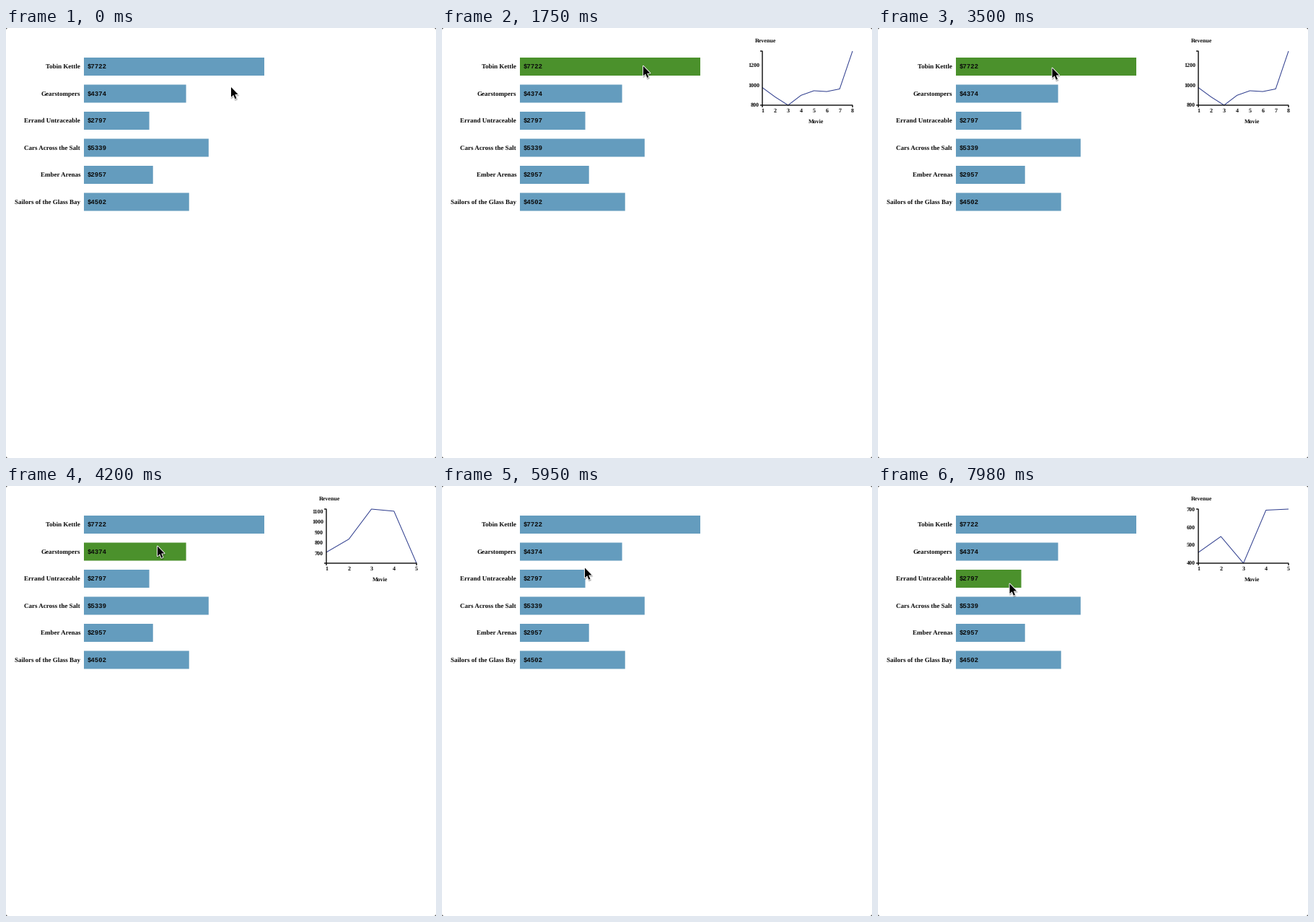
Write a matplotlib script that moves like this. It is 596x596 px and loops after 8000 ms.

```python
import matplotlib.pyplot as plt
import numpy as np
from matplotlib.animation import FuncAnimation
from matplotlib.patches import Polygon, Rectangle

SIZE, DPI = 596, 100
LOOP, INTERVAL, TICK = 8000, 20, 70
PX = 72 / DPI  # points per pixel
WAKE = 1540  # the page reacts to the pointer from here on

BLUE, GREEN, NAVY, INK = "#649cbe", "#4b912c", "#2b3a8c", "#0a0a0a"

# revenue per movie; a single value is a total without a chart
FRANCHISES = {
    "Tobin Kettle": [974, 879, 797, 896, 942, 934, 960, 1340],
    "Gearstompers": [709, 835, 1123, 1103, 604],
    "Errand Untraceable": [458, 547, 398, 694, 700],
    "Cars Across the Salt": [5339],
    "Ember Arenas": [2957],
    "Sailors of the Glass Bay": [4502],
}

# pointer key points: time, (x, y)
PATH = {
    0: (312, 82), 840: (280.5, 52.5), WAKE: (280.5, 52.5), 2520: (273, 53.5),
    3010: (250, 54.5), 3220: (250, 54.5), 3500: (241.5, 55.5),
    4200: (210, 83.5), 5950: (198, 113.5), 7350: (183.5, 134.5), 7980: (182.5, 135.5),
}
ARROW = 1.04 * np.array([(0, 0), (0, 13.2), (3.1, 10.4), (5.2, 15.6),
                         (7.2, 14.8), (5.1, 9.7), (9.2, 9.5)])

plt.rcParams["text.hinting"] = "no_hinting"
fig = plt.figure(figsize=(SIZE / DPI, SIZE / DPI), dpi=DPI, facecolor="white")
ax = fig.add_axes([0, 0, 1, 1])
ax.set(xlim=(0, SIZE), ylim=(SIZE, 0))
ax.axis("off")


def label(x, y, text, px, ha="left", family="Liberation Serif"):
    return ax.text(x, y, text, fontsize=px * PX, ha=ha, va="baseline",
                   family=family, weight="bold", color=INK, parse_math=False)


def line(xs, ys, color=INK, width=1.0):
    return ax.plot(xs, ys, color=color, lw=width * PX, snap=False,
                   solid_capstyle="butt", solid_joinstyle="miter")[0]


def nice_ticks(low, high, count=4):
    """Round tick values at a step of 1, 2, 5 or 10 times a power of ten."""
    raw = (high - low) / count
    base = 10 ** np.floor(np.log10(raw))
    ratio = base / raw
    step = int(base * (10 if ratio <= 0.15 else 5 if ratio <= 0.35 else 2 if ratio <= 0.75 else 1))
    return range(-(-low // step) * step, high + 1, step)


def draw_bar(row, name, total, scale):
    top = 41 + 37.5 * row
    bar = ax.add_patch(Rectangle((108, top), total * scale, 25, fc=BLUE, lw=0, snap=False))
    label(103, top + 15.4, name, 9, "right")
    label(113, top + 15.4, f"${total}", 9, family="Liberation Mono")
    return bar


def draw_chart(values):
    left, right, top, bottom = 444, 569, 32, 107
    low, high = min(values), max(values)

    def to_y(v):
        return bottom - (np.asarray(v) - low) / (high - low) * (bottom - top)

    xs = np.linspace(left, right, len(values))
    parts = [
        line(xs, to_y(values), NAVY),
        line([left - 3, left, left, left - 3], [top, top, bottom, bottom], width=1.4),
        line([left, left, right, right], [bottom + 3, bottom, bottom, bottom + 3], width=1.4),
        label(449, 20, "Revenue", 8, "center"),
        label(519, 132, "Movie", 8, "center"),
    ]
    parts += [label(left - 4, to_y(v) + 2.6, str(v), 8, "right") for v in nice_ticks(low, high)]
    parts += [label(x, bottom + 10, str(n), 8, "center") for n, x in enumerate(xs, 1)]
    return parts


def draw_pointer():
    """Soft shadow, white rim and black arrow, each with its drop."""
    layers = [(1.8, "black", 2.6, 0.10), (1.2, "black", 1.6, 0.16),
              (0, "white", 1.8, 1), (0, "black", 0, 1)]
    return [(ax.add_patch(Polygon(ARROW, fc=color, ec=color, lw=width * PX, alpha=alpha,
                                  joinstyle="round", zorder=10 + k)), drop)
            for k, (drop, color, width, alpha) in enumerate(layers)]


def draw_corners():
    for x, dx in ((0, 2), (SIZE, -2)):
        for y, dy in ((0, 2), (SIZE, -2)):
            ax.add_patch(Polygon([(x, y), (x + dx, y), (x, y + dy)], fc="#555555", lw=0))


draw_corners()
scale = 250 / max(map(sum, FRANCHISES.values()))
bars = [draw_bar(row, name, sum(values), scale)
        for row, (name, values) in enumerate(FRANCHISES.items())]
charts = [draw_chart(v) if len(v) > 1 else [] for v in FRANCHISES.values()]
pointer = draw_pointer()


def pointer_at(t):
    return np.array([np.interp(t, list(PATH), axis) for axis in zip(*PATH.values())])


def is_over(bar, pos):
    x, y = pos - bar.get_xy()
    return 0 <= x <= bar.get_width() and 0 <= y <= bar.get_height()


def update(i):
    t = (i * INTERVAL + INTERVAL // 2) // TICK * TICK
    pos = pointer_at(t)
    for bar, parts in zip(bars, charts):
        active = t >= WAKE and is_over(bar, pos)
        bar.set_facecolor(GREEN if active else BLUE)
        for part in parts:
            part.set_visible(active)
    for layer, drop in pointer:
        layer.set_xy(ARROW + pos + (drop / 3, drop))
    return []


anim = FuncAnimation(fig, update, frames=LOOP // INTERVAL, interval=INTERVAL,
                     repeat=True, repeat_delay=0, blit=False)
plt.show()
```
